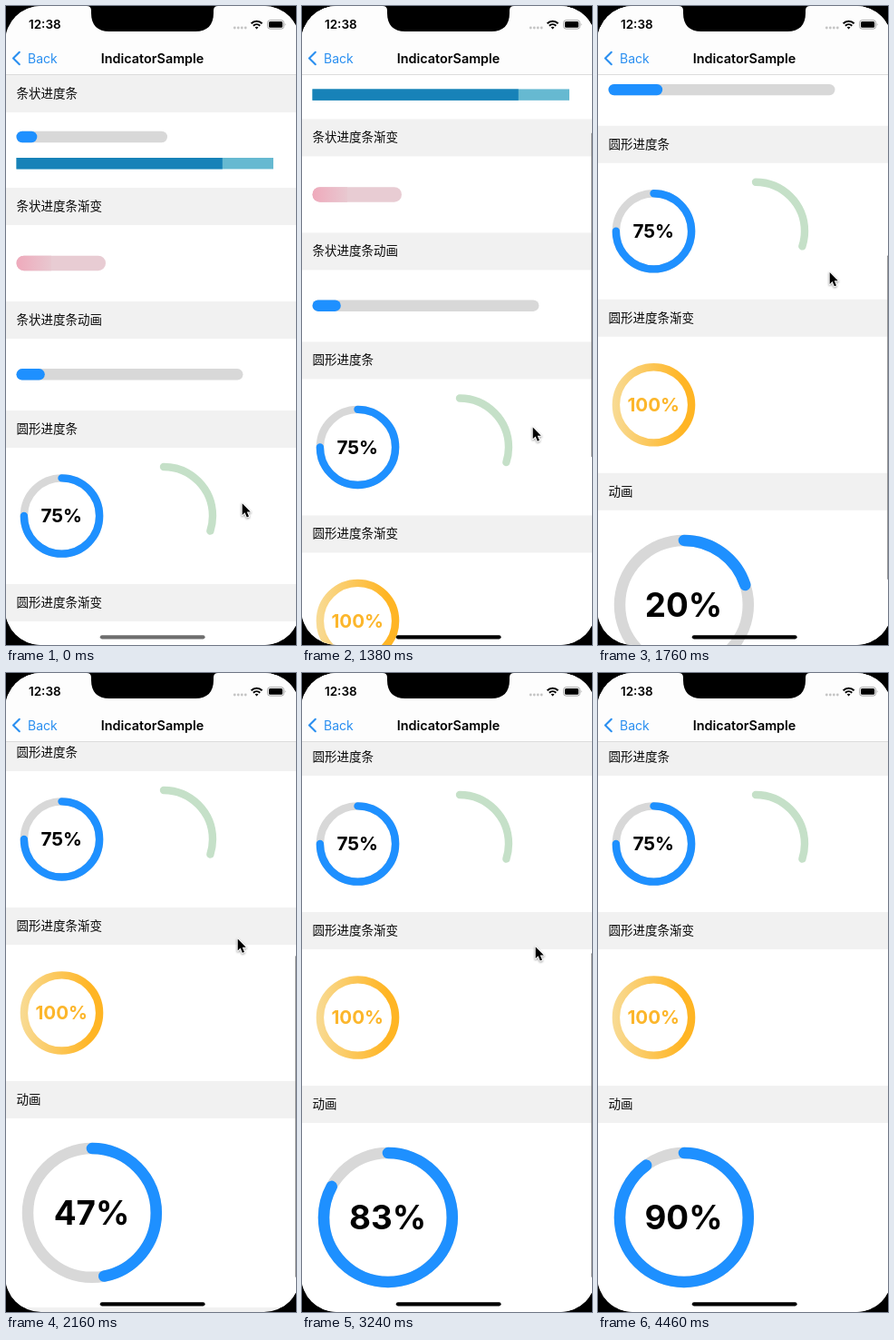
Recreate the animation shown at these times as an HTML page. Size 320 px wide and 703 px high, loop 5900 ms.

```html
<!DOCTYPE html>
<html lang="zh-CN">
<head>
<meta charset="utf-8">
<title>Progress indicators</title>
<style>
  html, body { margin: 0; width: 100%; height: 100%; overflow: hidden; background: #000; }
  svg { display: block; width: 320px; height: 703px; font-family: Inter, "Noto Sans", sans-serif; }
  .head rect { fill: #f1f1f1; }
  .head text { font: 400 13.5px "Noto Sans CJK SC", "Noto Sans CJK", sans-serif; fill: #0a0a0a; }
  .track { fill: #d8d8d8; }
  .blue { fill: #1e90ff; }
  .ring { fill: none; stroke-width: 8.4; stroke-linecap: round; }
  .big { stroke-width: 12.5; }
  .base { stroke: #d8d8d8; }
  .arc { stroke: #1e90ff; }
  .num { font-weight: 700; text-anchor: middle; }
  #cursor { fill: #000; stroke: #fff; stroke-width: 2; stroke-linejoin: round; paint-order: stroke;
            filter: drop-shadow(0 1px 1px rgba(0, 0, 0, .4)); }
</style>
</head>
<body>
<svg viewBox="0 0 320 703">
  <defs>
    <linearGradient id="pink">
      <stop offset="0" stop-color="#efa9bb"/>
      <stop offset="1" stop-color="#e8c8d0"/>
    </linearGradient>
    <linearGradient id="gold" gradientUnits="userSpaceOnUse" x1="16" y1="0" x2="107" y2="0">
      <stop offset="0" stop-color="#f8db95"/>
      <stop offset=".85" stop-color="#ffb524"/>
    </linearGradient>
    <clipPath id="screen"><rect x="-.8" width="325" height="703" rx="39.4"/></clipPath>
    <clipPath id="pill"><rect x="11.5" y="274.7" width="98.5" height="16.5" rx="8.25"/></clipPath>
  </defs>

  <g clip-path="url(#screen)">
    <rect width="320" height="703" fill="#f1f1f1"/>
    <g id="page">
      <rect y="76" width="320" height="1000" fill="#fff"/>
      <g id="heads"></g>

      <rect class="track" x="11.5" y="137.8" width="166.5" height="12.4" rx="6.2"/>
      <rect class="blue" x="11.5" y="137.8" width="22.8" height="12.4" rx="6.2"/>
      <rect x="11.5" y="167" width="283.5" height="12.4" fill="#66b9d1"/>
      <rect x="11.5" y="167" width="227.3" height="12.4" fill="#1782b8"/>

      <g clip-path="url(#pill)">
        <rect x="11" y="274" width="100" height="18" fill="#e8ccd3"/>
        <rect x="11" y="274" width="39" height="18" fill="url(#pink)"/>
      </g>

      <rect class="track" x="11.5" y="399.1" width="250" height="12.4" rx="6.2"/>
      <rect id="bar" class="blue" x="11.5" y="399.1" width="31.3" height="12.4" rx="6.2"/>

      <circle class="ring base" cx="61.5" cy="561" r="41.6"/>
      <circle class="ring arc" cx="61.5" cy="561" r="41.6" pathLength="100" stroke-dasharray="75 100" transform="rotate(-90 61.5 561)"/>
      <text class="num" x="61.2" y="568.3" font-size="20.6">75%</text>
      <circle class="ring" cx="174" cy="561" r="54" pathLength="100" stroke="#c5e0c8" stroke-dasharray="30 100" transform="rotate(-90 174 561)"/>

      <circle class="ring" cx="61.5" cy="752" r="41.6" stroke="url(#gold)"/>
      <text class="num" x="61.2" y="759.3" font-size="20.6" fill="#fcb62b">100%</text>

      <circle class="ring big base" cx="94.9" cy="972" r="70.9"/>
      <circle id="dial" class="ring big arc" cx="94.9" cy="972" r="70.9" pathLength="100" transform="rotate(-90 94.9 972)"/>
      <text id="count" class="num" x="94.5" y="985.2" font-size="36.8"></text>
    </g>

    <rect id="thumb" x="319.2" width="2.5" rx="1.2" fill="#858585"/>

    <rect width="320" height="75.5" fill="#fdfdfd"/>
    <rect y="75" width="320" height="1" fill="#dcdcdc"/>
    <path d="M14.8 50.8 8 57.5l6.8 6.7" fill="none" stroke="#2a8ff0" stroke-width="2.1" stroke-linecap="round" stroke-linejoin="round"/>
    <text x="24" y="62.6" font-size="14" fill="#2a8ff0">Back</text>
    <text x="161.6" y="62.6" font-size="14.4" font-weight="600" text-anchor="middle">IndicatorSample</text>

    <text x="25" y="25.3" font-size="13.5" font-weight="600">12:38</text>
    <g fill="#c4c4c4">
      <circle cx="252.3" cy="24" r="1.4"/><circle cx="256.3" cy="24" r="1.4"/>
      <circle cx="260.3" cy="24" r="1.4"/><circle cx="264.3" cy="24" r="1.4"/>
    </g>
    <g fill="none" stroke="#000" stroke-width="2">
      <path d="M270.6 19.3a8.6 8.6 0 0 1 12 0M272.9 21.8a5.3 5.3 0 0 1 7.4 0"/>
      <path d="M276.6 25.6l-1.9-2a2.7 2.7 0 0 1 3.8 0z" fill="#000" stroke="none"/>
    </g>
    <rect x="288.6" y="15.7" width="18" height="9.4" rx="2.7" fill="none" stroke="#999" stroke-width=".9"/>
    <rect x="290" y="17.1" width="15.2" height="6.6" rx="1.5"/>
    <path d="M307.8 18.8q1.600 1.600 0 3.200z" fill="#999"/>
    <path d="M89 0q5 0 5 5v3c0 13 7 20 20 20h95c13 0 20-7 20-20V5q0-5 5-5z"/>

    <rect id="home" x="103.8" y="692.2" width="115.8" height="4.2" rx="2.1"/>
    <g id="cursor"><path d="M.7 1.200v12.800l2.900-2.800 2.200 5.200 2.200-.9-2.200-5.100h4z"/></g>
  </g>
</svg>
<script>
  const LOOP = 5900, MAX = 373;
  const $ = id => document.getElementById(id);
  const clamp = v => Math.min(1, Math.max(0, v));

  const heads = [[76, '条状进度条'], [200, '条状进度条渐变'], [325, '条状进度条动画'],
                 [445, '圆形进度条'], [636, '圆形进度条渐变'], [827, '动画']];
  $('heads').innerHTML = heads.map(([y, label]) =>
    `<g class="head"><rect y="${y}" width="320" height="41"/><text x="11.6" y="${y + 25}">${label}</text></g>`).join('');

  // Monotone cubic through rows of [time, value, ...]
  function along(keys, t, col = 1) {
    const last = keys.length - 1;
    if (t <= keys[0][0]) return keys[0][col];
    if (t >= keys[last][0]) return keys[last][col];
    const rate = i => (keys[i + 1][col] - keys[i][col]) / (keys[i + 1][0] - keys[i][0]);
    const slope = i => {
      if (i === 0) return 0;
      if (i === last) return rate(i - 1);
      const a = rate(i - 1), b = rate(i);
      return a * b <= 0 ? 0 : 2 * a * b / (a + b);
    };
    let i = 0;
    while (t > keys[i + 1][0]) i++;
    const [p, q] = [keys[i], keys[i + 1]], h = q[0] - p[0], u = (t - p[0]) / h;
    const e = u * u * (3 - 2 * u);
    return p[col] + (q[col] - p[col]) * e
      + h * u * (1 - u) * ((1 - u) * slope(i) - u * slope(i + 1));
  }

  const drag = [[1210, 0], [1290, 20], [1380, 75], [1530, 155], [1680, 246], [1760, 312.4], [1834, MAX]];
  const pointer = [[0, 260, 546], [450, 260, 546], [880, 252, 578], [1030, 252, 579], [1210, 252, 579],
                   [1290, 253, 535], [1380, 254, 463], [1530, 254.5, 383], [1680, 255, 292], [3060, 255, 291],
                   [3240, 257, 300], [3650, 266, 332], [4260, 318, 545], [4460, 323, 562]];

  // Drag and glide, then a critically damped bounce at the end
  function scrollAt(t) {
    const dt = t - 1834;
    return dt < 0 ? along(drag, t) : MAX + 0.78 * dt * Math.exp(-0.012 * dt);
  }

  function draw(t) {
    const s = scrollAt(t);
    $('page').setAttribute('transform', `translate(0 ${-s})`);

    const grow = 1 - (1 - clamp((t - 1520) / 2900)) ** 3;
    const pct = Math.floor(90 * grow + 1e-6);
    $('bar').setAttribute('width', 31.3 + 124 * grow);
    $('dial').setAttribute('stroke-dasharray', `${pct} 100`);
    $('dial').style.visibility = pct > 0 ? 'visible' : 'hidden';
    $('count').textContent = pct + '%';

    const top = 96.5 + 0.567 * s;
    $('thumb').setAttribute('y', top);
    $('thumb').setAttribute('height', Math.min(357, 665 - top));
    $('thumb').style.opacity = t < 1210 ? 0 : 1 - clamp((t - 3300) / 300);

    const grey = Math.round(110 * (1 - clamp((t - 1210) / 150)));
    $('home').setAttribute('fill', `rgb(${grey},${grey},${grey})`);
    $('cursor').setAttribute('transform', `translate(${along(pointer, t, 1)} ${along(pointer, t, 2)})`);
  }

  const start = performance.now();
  function tick() {
    draw((performance.now() - start) % LOOP);
    requestAnimationFrame(tick);
  }
  tick();
</script>
</body>
</html>
```
